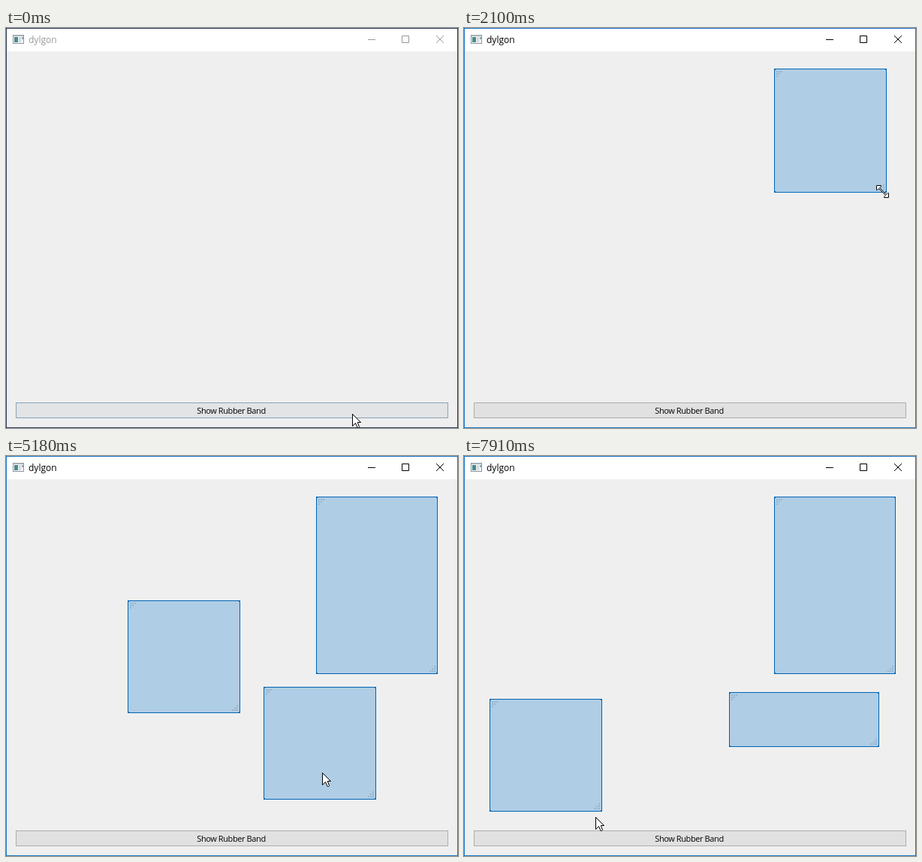
An HTML page with a canvas that plays this animation: 602 px wide and 532 px high, repeating every 8 s.

```html
<!DOCTYPE html>
<html lang="en">
<head>
<meta charset="utf-8">
<title>Rubber bands</title>
<style>
html, body { margin: 0; width: 602px; height: 532px; overflow: hidden; }
canvas { display: block; }
</style>
</head>
<body>
<canvas id="stage" width="602" height="532"></canvas>
<script>
const ctx = document.getElementById('stage').getContext('2d');
const LOOP = 8000;
const LAG = 18; // a resized band trails the pointer
const BORDER = '#0064b3';

// Pointer strokes: start and end in ms, destination, and the drag they perform
const home = [461, 513];
const strokes = [
  [380, 530, 237, 256],
  [540, 980, 433, 137, 'move0'],
  [1040, 1400, 488, 118, 'move0'],
  [1430, 1650, 544, 197],
  [1750, 1800, 557, 197],
  [2045, 2100, 557, 217, 'size0'],
  [2100, 2200, 569, 283, 'size0'],
  [2360, 2640, 313, 504],
  [2820, 3080, 382, 512],
  [3300, 3600, 273, 288],
  [3950, 4270, 300, 505],
  [4460, 4710, 240, 306],
  [4760, 5250, 431, 428, 'move2'],
  [5290, 5560, 499, 476],
  [5580, 5940, 495, 461],
  [6110, 6500, 545, 384, 'size2'],
  [6540, 6780, 243, 256],
  [7120, 7290, 101, 394, 'move1'],
  [7440, 7520, 115, 387, 'move1'],
  [7750, 7910, 175, 480]
];

// Each press of the button plays the same fades and adds one band
const presses = [250, 3100, 4340];
const BAND_DELAY = 130;

const lerp = (a, b, u) => a + (b - a) * u;
const mix = (a, b, u) => a.map((v, k) => lerp(v, b[k], u));
const ramp = (t, start, end) => Math.min(Math.max((t - start) / (end - start), 0), 1);
const ease = u => u * u * (3 - 2 * u);

// Button colours: fill rgb, border rgb
const normal = [225, 225, 225, 173, 173, 173];
const hot = [229, 241, 251, 0, 120, 215];
const down = [204, 228, 247, 0, 84, 153];
const fades = [ // start and end relative to the press
  [-280, -130, hot], [-30, 0, down], [90, 190, mix(down, hot, .5)], [290, 630, normal]
];

const arrow = new Path2D('M.5 .5V16.5L4.5 12.5L7.2 18.5H8.7L9.5 17.5L7.3 11.5H11.5Z');
const resize = new Path2D('M.5 .5H6.5V1.5L4.5 3.5L13.5 12.5L15.5 10.5H16.5V16.5' +
  'H10.5V15.5L12.5 13.5L3.5 4.5L1.5 6.5H.5Z');

// Distance covered by time t, in all strokes or only those of one drag
function travel(t, drag) {
  let at = home, sum = [0, 0];
  for (const [start, end, x, y, tag] of strokes) {
    const next = mix(at, [x, y], ease(ramp(t, start, end)));
    if (!drag || tag === drag) sum = sum.map((v, k) => v + next[k] - at[k]);
    at = next;
  }
  return sum.map(Math.round);
}

function rect(x, y, w, h, fill, border) {
  ctx.fillStyle = fill;
  ctx.fillRect(x, y, w, h);
  if (border) {
    ctx.strokeStyle = border;
    ctx.strokeRect(x + .5, y + .5, w - 1, h - 1);
  }
}

function text(str, x, y, size, color, align, spacing) {
  ctx.font = size + 'px "Open Sans", "Noto Sans", sans-serif';
  ctx.letterSpacing = spacing + 'px';
  ctx.textAlign = align;
  ctx.fillStyle = color;
  ctx.fillText(str, x, y);
}

function drawWindow(active) {
  const ink = active ? '#000' : '#999';
  rect(0, 0, 602, 532, '#efefef', active ? '#1a78c8' : '#2b3b57');
  rect(1, 1, 600, 30, '#fff');
  rect(9, 9, 15, 12, '#f6f6f6', '#8f969c');
  rect(10, 9, 13, 2, '#a9b0b6');
  rect(11, 12, 5, 7, '#4c8a8c');
  rect(17, 12, 3, 7, '#d3dadd');
  rect(21, 12, 2, 3, '#8fa9b8');
  text('dylgon', 30, 20, 12, ink, 'left', 0);
  ctx.strokeStyle = ink;
  ctx.stroke(new Path2D('M482 15.5h10M527.5 10.5h9v9h-9zM573 10l10 10m0-10l-10 10'));
}

function drawButton(t) {
  let color = normal;
  for (const press of presses)
    for (const [start, end, next] of fades)
      color = mix(color, next, ramp(t, press + start, press + end));
  const c = color.map(Math.round);
  rect(13, 498, 576, 21, `rgb(${c.slice(0, 3)})`, `rgb(${c.slice(3)})`);
  text('Show Rubber Band', 300, 513, 11, '#000', 'center', -.4);
}

function drawGrips(x, y, w, h) {
  for (let row = 0; row < 3; row++)
    for (let col = 0; col < 3 - row; col++) {
      const dx = 3 + 3 * col, dy = 3 + 3 * row;
      rect(x + dx, y + dy, 2, 2, '#98b5cd');
      rect(x + w - dx - 2, y + h - dy - 2, 2, 2, '#98b5cd');
    }
}

function drawBands(t) {
  const bands = presses.filter(press => t >= press + BAND_DELAY).map((_, i) => {
    const [dx, dy] = travel(t, 'move' + i), [dw, dh] = travel(t - LAG, 'size' + i);
    return [162 + dx, 192 + dy, 150 + dw, 150 + dh];
  });
  for (const [x, y, w, h] of bands) {
    rect(x, y, w, h, 'rgba(113,171,219,.5)', BORDER);
    for (const cx of [x + 1, x + w - 2])
      for (const cy of [y + 1, y + h - 2]) rect(cx, cy, 1, 1, BORDER);
    const stacked = bands.filter(b => b[0] === x && b[1] === y).length > 1;
    if (!stacked) drawGrips(x, y, w, h);
  }
}

// The resize shape shows from arrival at a corner until the pointer leaves it
function isSizing(t) {
  const i = strokes.findLastIndex(stroke => stroke[0] <= t);
  if (i < 0) return false;
  const sizes = stroke => stroke?.[4]?.startsWith('size');
  return sizes(strokes[i]) || sizes(strokes[i + 1]) && t >= strokes[i][1] - 20;
}

function drawPointer(t) {
  const sizing = isSizing(t), shape = sizing ? resize : arrow;
  const [x, y] = travel(t).map((v, k) => v + home[k] - (sizing ? 8 : 0));
  ctx.save();
  ctx.translate(x, y);
  ctx.fillStyle = '#fff';
  ctx.strokeStyle = '#000';
  ctx.fill(shape);
  ctx.stroke(shape);
  ctx.restore();
}

function tick() {
  const t = performance.now() % LOOP;
  drawWindow(t >= presses[0]);
  drawButton(t);
  drawBands(t);
  drawPointer(t);
  requestAnimationFrame(tick);
}
tick();
</script>
</body>
</html>
```
